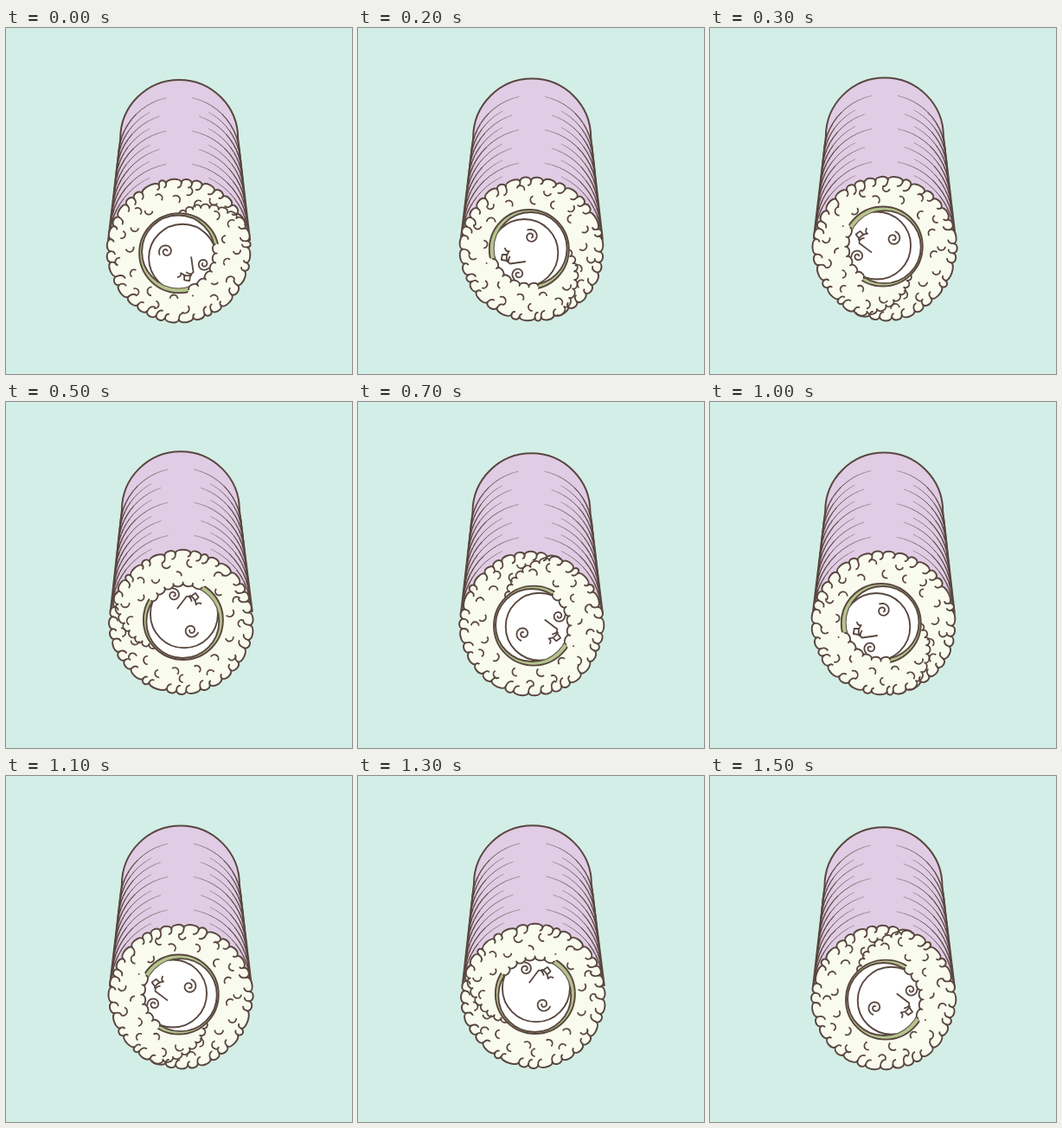
An HTML page with a canvas for the animation above (1.6 s loop, 400 by 400 pixels).

```html
<!DOCTYPE html>
<html>
<head>
<meta charset="utf-8">
<title>Rolling sushi</title>
<style>
html, body { margin: 0; height: 100%; overflow: hidden; background: #d3eee6; }
canvas { display: block; }
</style>
</head>
<body>
<canvas id="stage" width="400" height="400"></canvas>
<script>
const ctx = document.getElementById('stage').getContext('2d');
const SKY = '#d3eee6', INK = '#594740', PURPLE = '#e0cce4', RICE = '#f9fbee', GREEN = '#b4c48c';
const STEP = 100, STEPS = 8, LAYERS = 12, TAU = Math.PI * 2;
const rad = deg => deg * Math.PI / 180;
const mix = (a, b, k) => a + (b - a) * k;
const polar = (r, a) => [r * Math.cos(a), r * Math.sin(a)];

let seed = 23;
const random = () => (seed = (seed * 16807) % 2147483647) / 2147483647;
const jitter = size => (random() - 0.5) * size;

// Points along a spiral, angles in degrees
const spiralPoints = (count, from, to, r0, r1) => Array.from({ length: count }, (_, i) => {
  const k = i / (count - 1);
  return polar(mix(r0, r1, k), rad(mix(from, to, k)));
});

// Everything on the front face is measured from its centre, at zero turn.
const rim = Array.from({ length: 36 }, (_, i) =>
  polar(79 + jitter(2), (i + jitter(0.6)) / 36 * TAU));
const hooks = rim.map(() => 3 + random() * 5);
const seam = spiralPoints(9, -88, -21, 40, 81);
const overlap = spiralPoints(7, 76, -10, 47, 43);
const grains = Array.from({ length: 26 }, (_, i) => ({
  at: polar(i % 2 ? 56 + jitter(6) : 68 + jitter(6), (i + jitter(0.5)) / 26 * TAU),
  aim: random() * TAU,
  size: 4 + random()
}));

function stroke(width) {
  ctx.lineWidth = width;
  ctx.strokeStyle = INK;
  ctx.stroke();
}

function fill(color) {
  ctx.fillStyle = color;
  ctx.fill();
}

function disc(x, y, r, color) {
  ctx.beginPath();
  ctx.arc(x, y, r, 0, TAU);
  fill(color);
  stroke(1.9);
}

// Starts a scalloped line that bulges to the left of its direction.
function scallop(points, height) {
  ctx.beginPath();
  ctx.moveTo(...points[0]);
  for (let i = 1; i < points.length; i++) {
    const [x0, y0] = points[i - 1], [x1, y1] = points[i];
    const len = Math.hypot(x1 - x0, y1 - y0);
    const nx = (y1 - y0) / len * height, ny = (x0 - x1) / len * height;
    ctx.bezierCurveTo(x0 + nx, y0 + ny, x1 + nx, y1 + ny, x1, y1);
  }
}

// A line on one side of the roll that thins out towards the top
function crease(x, y, r, side, reach) {
  const parts = 12;
  for (let n = 0; n < parts; n++) {
    const from = reach * n / parts, to = reach * (n + 1) / parts;
    ctx.beginPath();
    ctx.moveTo(x + side * r * Math.cos(from), y - r * Math.sin(from));
    ctx.lineTo(x + side * r * Math.cos(to), y - r * Math.sin(to));
    stroke(mix(1.9, 0.3, n / parts));
  }
}

function drawRoll(back, front) {
  ctx.beginPath();
  ctx.arc(back.x, back.y, back.r, Math.PI, 0);
  ctx.lineTo(front.x + front.r, front.y - 12);
  ctx.lineTo(front.x - front.r, front.y - 12);
  ctx.closePath();
  fill(PURPLE);
  stroke(2);

  for (let i = 2; i < LAYERS; i++) {
    const k = i / LAYERS, r = mix(back.r, front.r, k);
    const x = mix(back.x, front.x, k), y = mix(back.y, front.y, k);
    const gap = i % 2 ? 34 : i % 4 ? 15 : 23;
    for (const side of [-1, 1]) crease(x, y, r, side, Math.acos(gap / r));
  }
}

function drawRice() {
  scallop([...rim, rim[0]], 6);
  fill(RICE);
  stroke(2);

  ctx.beginPath();
  rim.forEach(([x, y], i) => {
    const a = Math.atan2(y, x), r = Math.hypot(x, y), size = hooks[i];
    ctx.moveTo(x, y);
    ctx.quadraticCurveTo(...polar(r - size, a), ...polar(r - size, a - size / 90));
  });
  for (const { at: [x, y], aim, size } of grains) {
    const [dx, dy] = polar(size, aim);
    ctx.moveTo(x + dx, y + dy);
    ctx.arc(x, y, size, aim, aim + 3.1);
  }
  stroke(1.8);

  scallop(seam, 6);
  stroke(1.8);
}

function drawFilling() {
  disc(0, 3, 46, GREEN);
  disc(-1, 1.2, 42, '#fff');
  ctx.save();
  ctx.clip();
  disc(4, 8.5, 39, '#fff');
  ctx.restore();

  scallop(overlap, 5.5);
  for (const p of spiralPoints(5, -8, 82, 52, 55)) ctx.lineTo(...p);
  fill(RICE);
  scallop(overlap, 5.5);
  stroke(1.9);
}

function drawEye(x, y, r, start) {
  ctx.beginPath();
  for (let a = 0; a < 10; a += 0.25) {
    const [dx, dy] = polar(r * (1 - a / 11.5), start + a);
    ctx.lineTo(x + dx, y + dy);
  }
  stroke(1.8);
}

function drawFace() {
  drawEye(-15, 1, 8.5, 2.6);
  drawEye(28.5, 15.5, 7.5, 0.6);
  ctx.stroke(new Path2D(
    'M14 7 L16.5 25 Q14 29 8 25 M-2 31 Q3 30 2 26 Q8 31 15 28 M6 29 L6 34 L12 35 L13 29'));
}

function draw(step) {
  const turn = step / STEPS * TAU, c = Math.cos(turn), s = Math.sin(turn);
  const back = { x: 201.2 - c, y: 126.4 + 1.5 * c + 0.2 * s, r: 68 };
  const front = { x: 201.4 - 1.3 * c - 0.6 * s, y: 255.6 + 1.7 * c + 0.4 * s, r: 82 };

  ctx.fillStyle = SKY;
  ctx.fillRect(0, 0, 400, 400);
  drawRoll(back, front);
  ctx.save();
  ctx.translate(front.x, front.y);
  ctx.rotate(turn);
  drawRice();
  drawFilling();
  drawFace();
  ctx.restore();
}

function tick() {
  draw(Math.floor(performance.now() / STEP) % STEPS);
  requestAnimationFrame(tick);
}

ctx.lineJoin = 'round';
tick();
</script>
</body>
</html>
```
